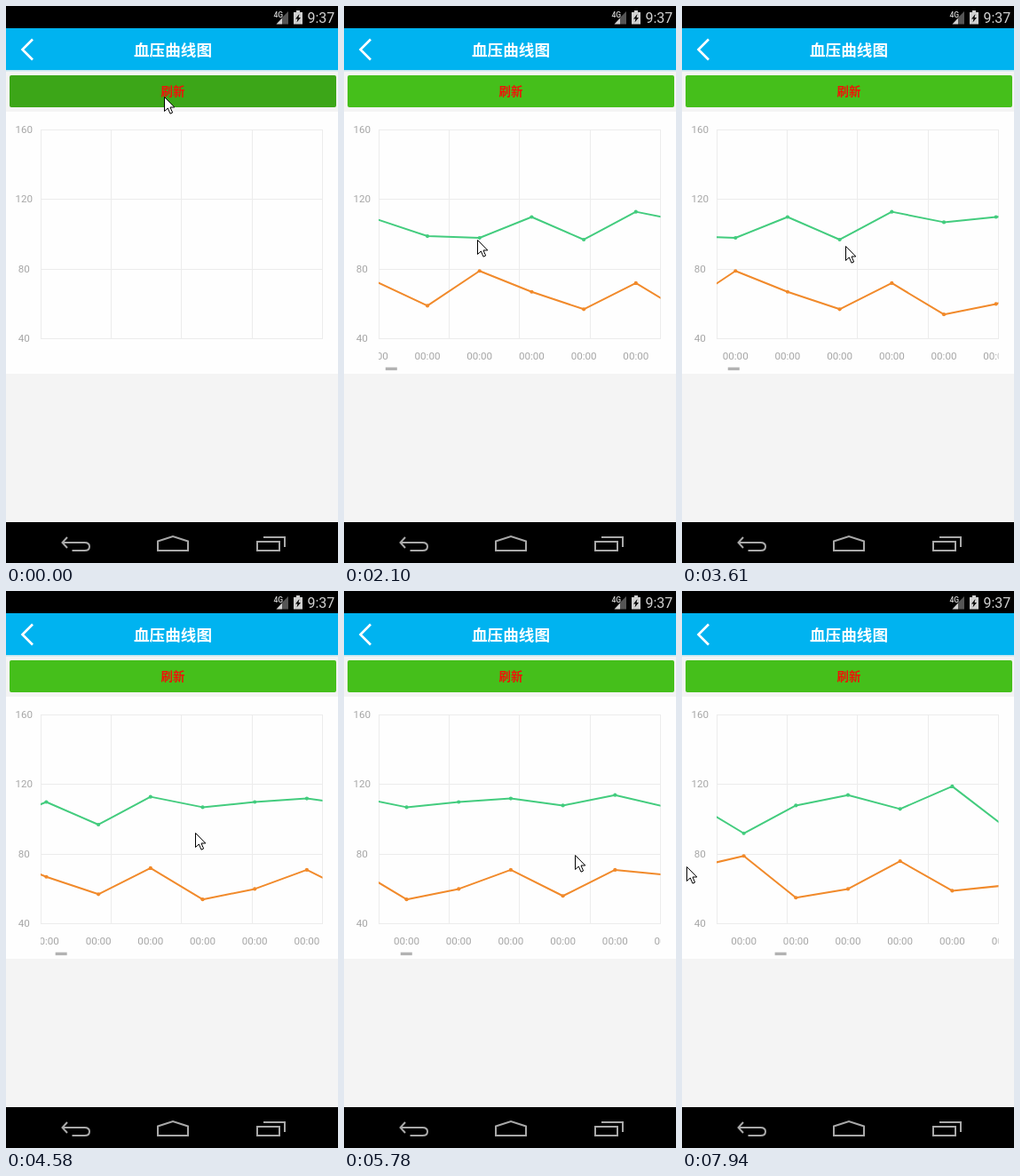
Recreate the animation shown at these times as an HTML page. Size 374 by 627 pixels, loop 8 s.

```html
<!DOCTYPE html>
<html lang="zh">
<head>
<meta charset="utf-8">
<title>血压曲线图</title>
<style>
  html, body { margin: 0; width: 100%; height: 100%; overflow: hidden; background: #f4f4f4; }
  svg { display: block; width: 374px; height: 627px; }
  text { font-family: Roboto, "Noto Sans CJK SC", "Noto Sans CJK", sans-serif; }
  .cjk { font-family: "Noto Sans CJK SC", "Noto Sans CJK", sans-serif; font-weight: 700; text-anchor: middle; }
  .label { font-size: 11.6px; fill: #a6a6a6; text-anchor: middle; }
  .grid { stroke: #ececec; fill: none; }
  .line { fill: none; stroke-width: 2; stroke-linejoin: round; }
  .nav { fill: none; stroke: #a9a9a9; stroke-width: 2; }
</style>
</head>
<body>
<svg viewBox="0 0 374 627">
  <defs>
    <clipPath id="plot"><rect x="39" y="120" width="317.5" height="292"/></clipPath>
    <linearGradient id="shade" x2="0" y2="1">
      <stop stop-color="#b9dfec"/><stop offset="1" stop-color="#f4f4f4"/>
    </linearGradient>
  </defs>
  <rect width="374" height="627" fill="#f4f4f4"/>

  <!-- status bar -->
  <rect width="374" height="26"/>
  <text x="301.5" y="12.5" font-size="8.5" font-weight="500" fill="#d0d0d0">4G</text>
  <path d="M318 6V20.500H311V13Z" fill="#555"/>
  <path d="M311 13.500V20.500H304.500Z" fill="#d0d0d0"/>
  <path d="M327 5h4v2h3v13.500h-10V7h3z" fill="#d0d0d0"/>
  <path d="M330.500 9l-4.500 5.500h2.500l-1 4 4.500-5.500h-2.500z"/>
  <text x="339.500" y="19" font-size="16" fill="#d2d2d2">9:37</text>

  <!-- header -->
  <rect y="25" width="374" height="47" fill="#00b3f0"/>
  <rect y="72" width="374" height="2.500" fill="url(#shade)"/>
  <path d="M30 37.500L18.500 49L30 60.500" fill="none" stroke="#fff" stroke-width="2.600"/>
  <text class="cjk" x="188" y="55.500" font-size="17.600" fill="#fff">血压曲线图</text>

  <rect id="button" x="4" y="78" width="368" height="36" rx="2"/>
  <text class="cjk" x="188" y="101" font-size="13.400" fill="#f01208">刷新</text>

  <!-- chart -->
  <rect y="119" width="374" height="295" fill="#fefefe"/>
  <g id="axes"></g>
  <g id="data" clip-path="url(#plot)"><g id="scroll"></g></g>
  <rect id="bar" y="406.700" width="13" height="3.400" fill="#b2b2b2"/>

  <!-- navigation bar -->
  <rect y="581" width="374" height="46"/>
  <path class="nav" d="M69 598L63.500 604L69 610M64 604H88.500Q94 604 94 608.500T88.500 613H74.500"/>
  <path class="nav" d="M171 613V602.500L188 597L205 602.500V613Z"/>
  <path class="nav" d="M283 603H308V613H283ZM290 598H314V609"/>

  <path id="cursor" d="M.500 .500V16.500L4.300 13L7 19.200L9.600 18L7 12H11.800Z" fill="#fff" stroke="#000"/>
</svg>
<script>
const LOOP = 8000, STEP = 137, FIRST_STEP = 707, LOADED = 280;
const POINT_GAP = 58.7, FIRST_POINT = 58.6;
const FLING = 372, FLING_FROM = 49, FLING_STEPS = 3;

const high = [93,109,99,98,110,97,113,107,110,112,108,114,107,106,116,102,111,98,105,110,92,108,114,106,119,96];
const low = [75,73,59,79,67,57,72,54,60,71,56,71,68,54,67,65,58,70,62,72,79,55,60,76,59,62];

// Turning points of the pointer: step, x, y
const path = [
  [-1, 178, 102], [2, 224, 250], [4, 232, 260], [13, 109, 265], [17.5, 235, 268], [26, 110, 272],
  [29, 265, 272], [35, 114, 292], [37.2, 275, 298], [45, 128, 280], [47, 250, 290], [49, 5, 310]
];

const $ = id => document.getElementById(id);
const clamp = v => Math.max(0, Math.min(1, v));
const valueY = v => 374.6 - (v - 40) * 235 / 120;
const pointX = i => FIRST_POINT + i * POINT_GAP;
const label = (x, y, s) => `<text class="label" x="${x}" y="${y}">${s}</text>`;

function series(values, color) {
  const pts = values.map((v, i) => [pointX(i), valueY(v)]);
  const dots = pts.map(([x, y]) => `<circle cx="${x}" cy="${y}" r="2.1" fill="${color}"/>`);
  return `<polyline class="line" stroke="${color}" points="${pts.join(' ')}"/>` + dots.join('');
}

function buildChart() {
  let axes = '';
  for (let i = 0; i < 5; i++) axes += `<path class="grid" d="M${Math.floor(39 + i * 79.4) + .5} 139V375"/>`;
  for (let v = 40; v <= 160; v += 40) {
    const y = Math.floor(valueY(v));
    axes += `<path class="grid" d="M39 ${y + .5}H357"/>` + label(20.3, y + 4.3, v);
  }
  $('axes').innerHTML = axes;
  $('scroll').innerHTML = series(high, '#43cc7e') + series(low, '#f18a2b') +
    high.map((_, i) => label(pointX(i), 397.7, '00:00')).join('');
}

// Every leftward move drags the chart; the last one ends in a fling.
function poseAt(step) {
  let [, x, y] = path[0], offset = 0;
  for (let i = 1; i < path.length; i++) {
    const [from, x0, y0] = path[i - 1], [to, x1, y1] = path[i];
    if (step <= from) break;
    const p = clamp((step - from) / (to - from));
    x = x0 + (x1 - x0) * p;
    y = y0 + (y1 - y0) * p;
    offset += Math.max(0, x0 - x);
  }
  const rest = 1 - clamp((step - FLING_FROM) / FLING_STEPS);
  return { x, y, offset: offset + FLING * (1 - rest * rest) };
}

function draw(now) {
  const t = now % LOOP, loaded = t >= LOADED;
  const { x, y, offset } = poseAt(Math.floor((t - FIRST_STEP) / STEP));
  $('button').setAttribute('fill', loaded ? '#45bf1b' : '#3ca618');
  $('data').style.display = loaded ? '' : 'none';
  $('bar').style.display = offset > 0 ? '' : 'none';
  $('scroll').setAttribute('transform', `translate(${-offset} 0)`);
  $('bar').setAttribute('x', 42.4 + offset * .0535);
  $('cursor').setAttribute('transform', `translate(${Math.round(x)} ${Math.round(y)})`);
}

buildChart();
const start = performance.now();
function tick() {
  draw(performance.now() - start);
  requestAnimationFrame(tick);
}
tick();
</script>
</body>
</html>
```
